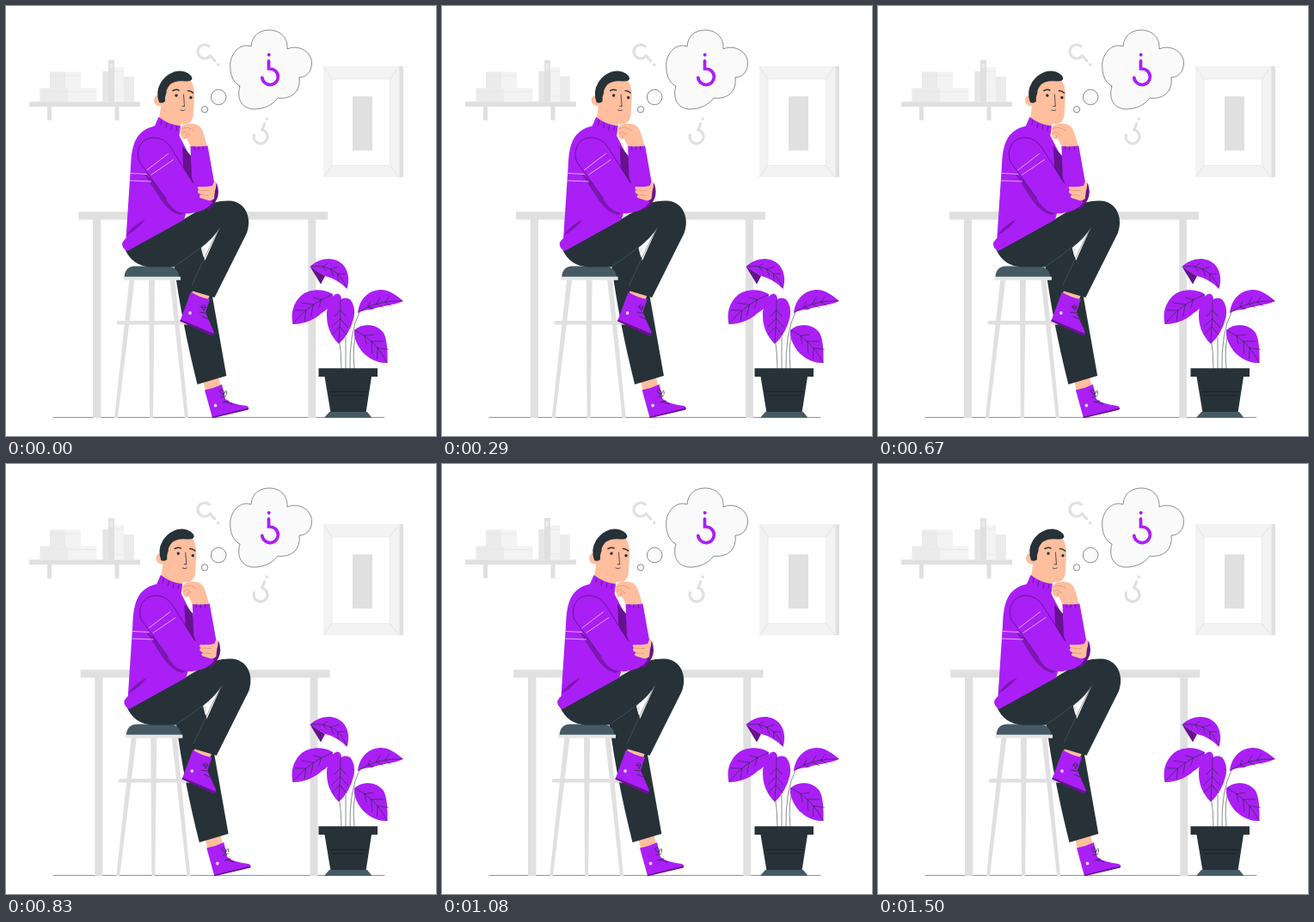
An HTML page for the animation above (1540 ms loop, 500 px wide and 500 px high).

```html
<!DOCTYPE html>
<html lang="en">
<head>
<meta charset="utf-8">
<title>Thinking</title>
<style>
  html, body { margin: 0; width: 100%; height: 100%; overflow: hidden; background: #fff; }
  svg { display: block; width: 100vw; height: 100vh; }
  .p { fill: #aa1ff5; }
  .dp { fill: #66128f; }
  .mp { fill: #7c17b2; }
  .k { fill: #263238; }
  .s { fill: #455a64; }
  .skin { fill: #ffbe9d; }
  .g { fill: #e0e0e0; }
  .g2 { fill: #ebebeb; }
  .g3 { fill: #f3f3f3; }
  .ln { fill: none; stroke: #263238; stroke-width: .8; stroke-linecap: round; stroke-linejoin: round; }
  .thin { stroke-width: .55; }
  .fold { fill: none; stroke: #4a1270; stroke-width: .7; stroke-linecap: round; }
  .lt { fill: none; stroke: #e3b8fb; stroke-width: .9; }
  .knuckle { fill: none; stroke: #df8f70; stroke-width: .7; }
  .cloud { fill: #fafafa; stroke: #263238; stroke-width: .55; }
  .q { fill: none; stroke: currentColor; stroke-width: 3.7; stroke-linecap: round; }
</style>
</head>
<body>
<svg viewBox="0 0 500 500">
  <defs>
    <g id="mark">
      <path class="q" d="M-1.5 -18.500V-9.300H0A9.300 9.300 0 1 1 -9.200 1"/>
      <circle cx="-1.300" cy="-25.500" r="2" fill="currentColor"/>
    </g>
  </defs>

  <!-- shelf -->
  <path class="g" d="M27 111.300H156V117H131.500V133H126.500V117H53V133H48V117H27Z"/>
  <path class="g2" d="M51 76.500H69V95.500H51ZM39.500 95.500H72V111.300H39.500ZM137 82H149V111.300H137Z"/>
  <path class="g3" d="M69 76.500H87V95.500H69ZM72 95.500H105.500V111.300H72ZM126 71.500H137V111.300H126Z"/>
  <path d="M112.300 76H119V111.300H112.300Z" fill="#e6e6e6"/>
  <path class="g" d="M119 63H126V111.300H119Z"/>
  <path d="M51 81H87M39.500 99.500H105.500M126 76H137M126 105H137" stroke="#e6e6e6" stroke-width=".8"/>
  <path class="g2" d="M120.500 67H124.500V73H120.500Z"/>

  <!-- picture frame -->
  <path class="g" d="M457 70H462V199H457Z"/>
  <path class="g3" d="M369 70H457.500V199H369Z"/>
  <path d="M379 85H446.500V185.500H379Z" fill="#fff" stroke="#ebebeb"/>
  <path d="M369 70L379 85M457 70L446.500 85M369 199L379 185.500M457 199L446.500 185.500" stroke="#e2e2e2" stroke-width=".9"/>
  <path class="g" d="M403 105H426V168H403Z"/>

  <!-- thought bubble -->
  <path class="cloud" d="M285 47C286 34 295 28 306 28C319 28 328 37 327 50C341 44 356 54 355.500 67C355 78 348 83 341 83C343 99 332 109 316 107C310 115 300 120 288 120C273 119 268 107 272 93C263 89 260 77 260.800 66C263 52 274 43 285 47Z"/>
  <circle class="cloud" cx="247.200" cy="106" r="8.800"/>
  <circle class="cloud" cx="231" cy="120.300" r="3.700"/>
  <use href="#mark" transform="translate(307 82.300)" color="#aa1ff5"/>
  <use href="#mark" transform="translate(296 152) rotate(22) scale(.86)" color="#e0e0e0"/>
  <use href="#mark" transform="translate(231 53) rotate(137) scale(.86)" color="#e0e0e0"/>

  <path class="ln thin" d="M55 478.400H440"/>

  <g id="sway">
    <!-- table -->
    <path class="g" d="M84.300 239.200H374.300V248.500H360.300V479H351.300V248.500H110.300V479H101V248.500H84.300Z"/>

    <!-- standing leg -->
    <path class="skin" d="M229 435L247 431L250 443L232 447Z"/>
    <path class="k" d="M195 298L226 278L231 295L240 338L256.300 430L222.500 440C211 394 202 350 195 298Z"/>
    <path class="p" d="M231 446.500Q241 445 251 440L255 457Q262 463 280 465Q283 467 281.500 469L240 479Z"/>
    <path class="dp" d="M239.700 477.800L282.500 467.200L281.500 469.500L240 479.300Z"/>
    <path class="ln" d="M250 455L256 453M252 461L259 459M253 452Q246 448 250 446Q254 446 253 452Q257 443 256.500 451M254 460L263 463"/>
    <circle cx="243.500" cy="464.500" r="1.900" fill="#e6d0f3"/>

    <!-- stool -->
    <path class="g" d="M143.500 318H149.500L130 479H126ZM166 318H173L171 479H167ZM190.500 318H196.500L212 479H208Z"/>
    <rect class="g" x="128.500" y="366" width="85" height="4.600" rx="2.300"/>
    <path class="s" d="M137.500 315.500C138 307 142 303 150 302.500H188C196 303 201 308 201.500 315.500Z"/>
    <path d="M136.500 314.800H203V318.700H136.500Z" fill="#e6e6e6"/>

    <!-- crossed leg -->
    <path class="skin" d="M218 329L237 336L234.500 343L215 336Z"/>
    <path class="k" d="M138 282C144 296 154 302.500 168 303.500H195C207 299 217 288 227 281C236 274 242 267 248 259L215.500 331L242.500 339L280 264C287 245 277 227 260 226.500C247 226 239 229 230 234L205 249Z"/>
    <path d="M227 282L231.500 281.500L229.500 292Z" fill="#e8e8e8"/>
    <path d="M196 302.500Q213 292 226 281Q240 271 249 258Q241 270 216 325" fill="none" stroke="#51616a" stroke-width=".6"/>
    <path class="p" d="M215 332.500Q225 339 237 341L232 356Q235 364 241.500 378Q242.500 383 239 383L202.500 366Z"/>
    <path class="dp" d="M203 364.500L241.700 381Q242 384 238.500 383L202.300 366.500Z"/>
    <path class="ln" d="M226 350L232 351M225 356L232 357M228 361L235 364M230 354Q225 347 230 348Q234 349 230 354"/>
    <circle cx="214" cy="357" r="1.900" fill="#e6d0f3"/>

    <!-- neck and head -->
    <path class="skin" d="M182 104L178 131Q190 141 203 140L204 130Z"/>
    <path class="skin" d="M181 104.500Q172.500 102 172 109.500Q172.500 117 181 116.500Z"/>
    <path class="skin" d="M182 112C181 96 188 82 205 82C215 82 218.500 91 219.200 104L217.500 129Q215 138 206 137.500Q190 136 183 122Z"/>
    <path class="k" d="M178 112Q173.500 100 180 89Q189 75.500 203 75.500Q214.500 77 216.500 84Q216 88 209 87.500Q197 86 191 91Q186 97 186.500 101Q184.500 105 185 111Q182 114 178 112Z"/>
    <path class="ln" d="M206.500 103L207.500 117L205 116.500M203 121Q206 122.500 208 121"/>
    <path class="ln" d="M194 98.500Q198 96.500 201 98M211.500 98.500Q215 98.500 217.500 101" style="stroke-width:1.500"/>
    <circle class="k" cx="198" cy="104" r="1.700"/>
    <circle class="k" cx="215" cy="106.500" r="1.700"/>

    <!-- torso -->
    <path class="p" d="M177.500 129Q189 138 203 139.500L201.500 151L214 175L217 215L207 248.500L141 285Q134 281 135.300 275Q138 271 139.500 270L145 187C146 162 150 145 173 139.500Z"/>
    <path class="fold" d="M181 133L180 138M187 136.500L186 141.500M193 139L192 144M199 140L198 145"/>
    <path class="mp" d="M140 267Q146 256 162 248Q154 259 140 267Z"/>
    <path class="mp" d="M160 194L180 225Q191 241 203 243L207 241L195 222Z"/>

    <!-- far arm and chin hand -->
    <path class="dp" d="M205 163L215 174L220 208H216L206.500 193Z"/>
    <path class="dp" d="M232 213L245 206Q249 217 245 225Q240 235 234 237Z"/>
    <path class="skin" d="M202.500 145Q203 138 211 137Q224 135 228 144Q231 151 234 164H215L210 154Q206 156 204 152Z"/>
    <path class="knuckle" d="M204 143Q212 139 219 145M203.500 149L208 146L214 150M208 154L210 149"/>
    <path class="p" d="M214.500 163Q224 164 234.500 162.500L243 210L223 216L216 200Z"/>
    <path class="fold" d="M219 163.500V167M224 163.500V167M229 163.500L229.500 167"/>

    <!-- near arm -->
    <path class="p" d="M152.500 172C153 156 167 148 181 155Q187 158 192 165L217 205L226 213L240 228Q233 239 215 241Q198 243 189 229L155 181Q152.500 177 152.500 172Z"/>
    <path class="fold" d="M186 224L155 181C150 168 157 153 172 153Q184 153 192 165L217 205"/>
    <path class="lt" d="M163.500 191L189 171.500M168.500 196.500L195 178.500M144.500 194.500L164 195.500M144 203L169 204"/>
    <path class="skin" d="M224 210Q232 211 240 209L242.500 203Q246 205 243 215L242 224Q239 227 235 226L225.500 223Q224 220 227 219.500L223.500 217.500Q222 215 224.500 214Q221 211 224 210Z"/>
    <path class="knuckle" d="M225 214.200L237 214.500M226 219.500L236 220.500"/>
  </g>

  <!-- plant -->
  <path d="M390 422Q390 402 387 385H394L395 422ZM400 422Q400 378 412 355Q402 380 405 422Z" fill="#fff"/>
  <path class="ln thin" d="M390 422Q390 402 387 385M395 422V385M400 422Q399 380 411 356M405 422Q402 390 409 377"/>
  <path class="p" d="M353.500 303C365 292 382 291 391 300C398 307 400 318 396.500 329Q385 317 371 314Z"/>
  <path class="dp" d="M353.500 303L371 314L366 323.500Z"/>
  <path class="p" d="M380 335C369 328 353 329 344 336C333 346 331 358 333.500 370C349 370 361 363 367 357C375 353 380 345 380 335Z"/>
  <path class="p" d="M390 341Q394 338 400 341Q407 349 404.500 362Q400 381 387 393C377 383 373 372 373 360C373 346 379 335 386 334.500Q390 336 390 341Z"/>
  <path class="p" d="M409 357C411 340 422 330 437 330C448 331 454 337 462 343C449 349 436 348 425 353Q416 353 409 357Z"/>
  <path class="p" d="M405 377C414 368 431 369 439 380C443 387 444 402 443.500 415C430 416 416 407 410 396Q404 386 405 377Z"/>
  <path class="ln" id="veins" style="stroke-width:.65"/>
  <path class="k" d="M363.500 421.300H432V431H363.500ZM370.500 431H425L418.500 473H377.500Z"/>
  <path d="M376 448.500H420M379 453H418" stroke="#10181c" stroke-width=".7"/>
  <path class="s" d="M376 472H420L425.500 478.700H370Z"/>
</svg>
<script>
  const LOOP = 1540, FRAMES = 37, SHAKE = 1500, STEP = 43;
  // horizontal shift at every tenth of the shake
  const stops = [0, -1, 2, -4, 4, -4, 4, -4, 2, -1, 0];
  const sway = document.getElementById('sway');

  // midrib from base to tip with three pairs of side veins leaning to the tip
  function veins(x0, y0, cx, cy, x1, y1, len) {
    let d = `M${x0} ${y0}Q${cx} ${cy} ${x1} ${y1}`;
    for (const t of [.25, .45, .65]) {
      const u = 1 - t;
      const x = u * u * x0 + 2 * u * t * cx + t * t * x1;
      const y = u * u * y0 + 2 * u * t * cy + t * t * y1;
      const a = Math.atan2(u * (cy - y0) + t * (y1 - cy), u * (cx - x0) + t * (x1 - cx));
      for (const side of [-.75, .75]) {
        const r = len * Math.sin(Math.PI * t);
        d += `M${x} ${y}l${r * Math.cos(a + side)} ${r * Math.sin(a + side)}`;
      }
    }
    return d;
  }

  document.getElementById('veins').setAttribute('d',
    veins(355, 303, 384, 299, 396, 327, 9) +
    veins(379, 336, 354, 345, 334, 369, 14) +
    veins(389, 342, 389, 365, 387, 391, 14) +
    veins(410, 356, 431, 342, 460, 343, 9) +
    veins(406, 377, 429, 388, 443, 414, 14));

  function shift(ms) {
    const x = Math.min(ms / SHAKE * 10, 10);
    const i = Math.min(Math.floor(x), 9);
    return stops[i] + (stops[i + 1] - stops[i]) * (x - i);
  }

  function draw(t) {
    const n = Math.floor(t % LOOP / LOOP * FRAMES + .1) % FRAMES;
    const x = n ? shift(n * STEP + 8) : 0;
    sway.setAttribute('transform', `translate(${x.toFixed(2)} 0)`);
  }

  const start = performance.now();
  function tick() {
    draw(performance.now() - start);
    requestAnimationFrame(tick);
  }
  tick();
</script>
</body>
</html>
```
